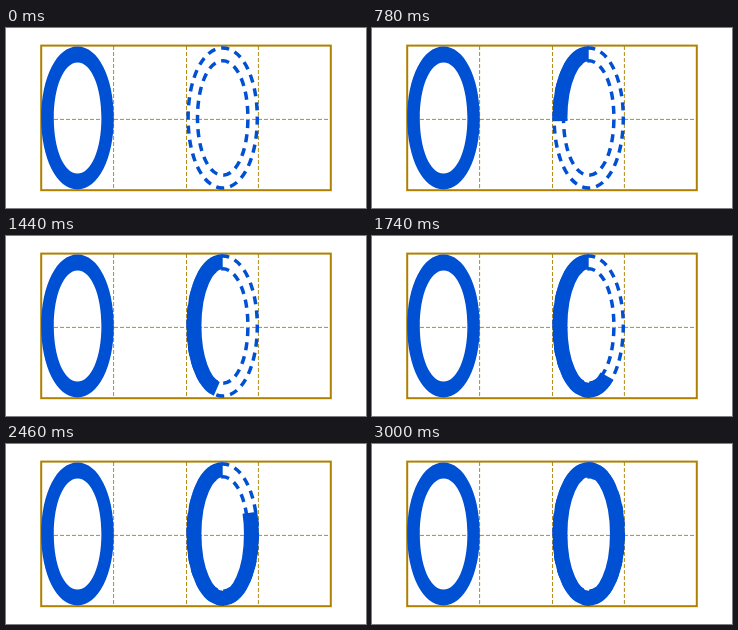
An HTML page for the animation above (5440 ms loop, 360 by 180 pixels).

```html
<!DOCTYPE html>
<html lang="en">
<head>
<meta charset="utf-8">
<title>Writing the digit zero</title>
<style>
  html, body { margin: 0; width: 100%; height: 100%; overflow: hidden; background: #fff; }
  svg { display: block; width: 360px; height: 180px; }
  .frame { fill: none; stroke: #b08000; stroke-width: 2; }
  .guide { fill: none; stroke: #b08000; stroke-width: 1; stroke-dasharray: 4 2; opacity: .9; }
  .digit { fill: #0050d4; fill-rule: evenodd; }
  .outline { fill: none; stroke: #0050d4; stroke-width: 3.5; stroke-dasharray: 8 6; stroke-dashoffset: 1.5; }
  .pen { fill: none; stroke: #0050d4; stroke-width: 14.9; stroke-dasharray: 50 60; stroke-dashoffset: 50; }
</style>
</head>
<body>
<svg viewBox="0 0 360 180">
  <path class="guide" d="M36 91.4H324M107.6 18V162M180.5 18V162M252.4 18V162"/>
  <rect class="frame" x="35.2" y="17.6" width="289.6" height="144.6"/>
  <path class="digit" id="model"/>
  <path class="outline" id="outer" pathLength="336"/>
  <path class="outline" id="inner" pathLength="266"/>
  <path class="pen" id="pen" pathLength="50"/>
</svg>
<script>
  const STEP = 60, STEPS = 50, LOOP = 5440;
  const ROUND = 0.57; // handle length, slightly fuller than an ellipse
  const $ = id => document.getElementById(id);

  // Oval starting at the top; a negative rx runs counterclockwise.
  const oval = (cx, cy, rx, ry) => {
    const hx = rx * ROUND, hy = ry * ROUND;
    return `M${cx} ${cy - ry}` +
      `C${cx + hx} ${cy - ry} ${cx + rx} ${cy - hy} ${cx + rx} ${cy}` +
      `S${cx + hx} ${cy + ry} ${cx} ${cy + ry}` +
      `S${cx - rx} ${cy + hy} ${cx - rx} ${cy}` +
      `S${cx - hx} ${cy - ry} ${cx} ${cy - ry}Z`;
  };

  const draw = (id, ...paths) => $(id).setAttribute('d', paths.join(''));
  draw('model', oval(71.5, 90, 36.3, 71.4), oval(71.6, 90, 23.8, 55.6));
  draw('outer', oval(216.7, 90, 34.6, 70));
  draw('inner', oval(216.7, 90, 25.2, 57.2));
  draw('pen', oval(216.7, 90, -28.7, 64.2));

  $('pen').animate([
    { strokeDashoffset: STEPS, offset: 0, easing: `steps(${STEPS}, end)` },
    { strokeDashoffset: 0, offset: STEP * STEPS / LOOP },
    { strokeDashoffset: 0, offset: 1 }
  ], { duration: LOOP, iterations: Infinity });
</script>
</body>
</html>
```
